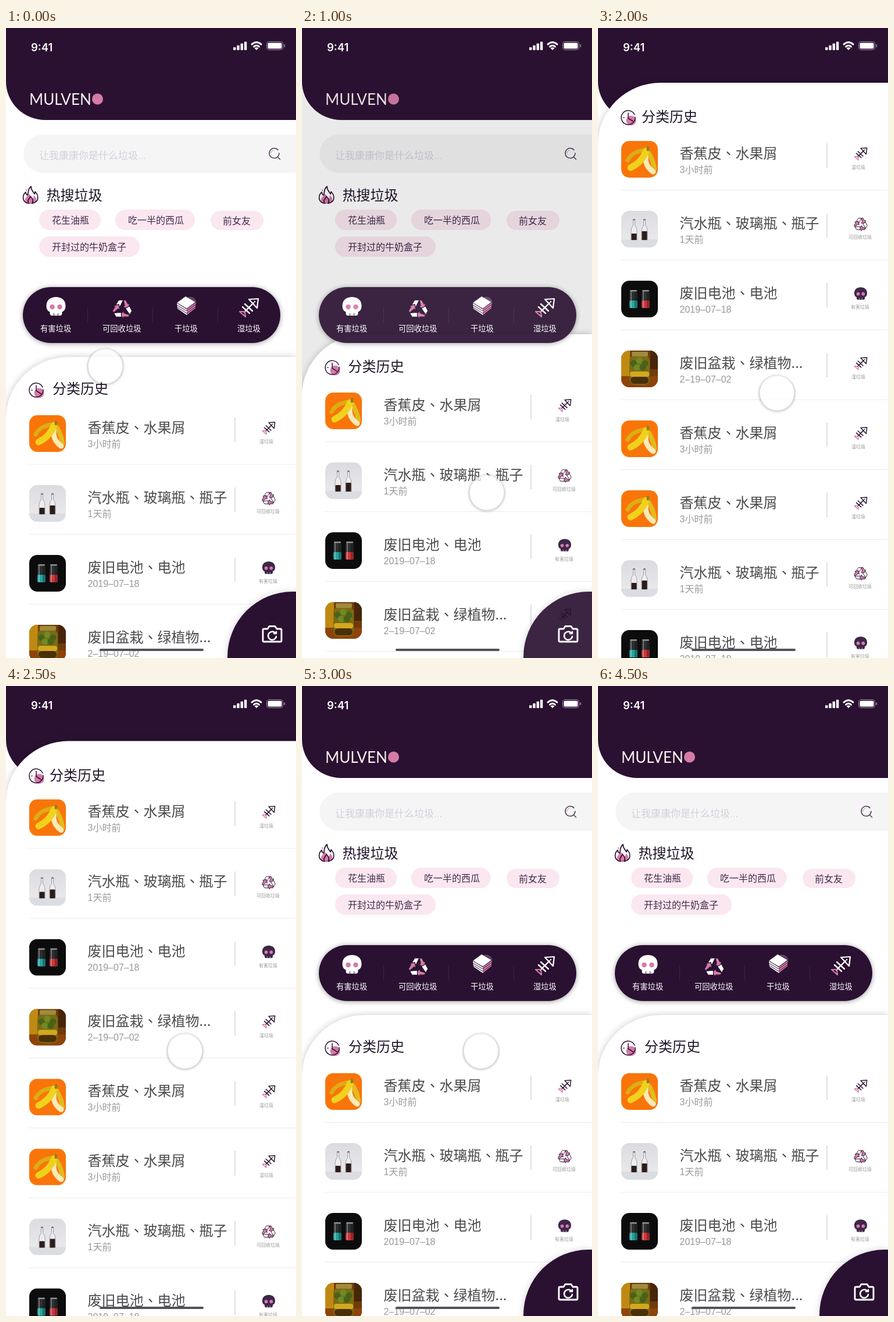
Animation of 499 by 1082 pixels, one loop 4.75 s. Source, as an HTML page:

```html
<!DOCTYPE html>
<html lang="zh-CN">
<head>
<meta charset="utf-8">
<style>
  html, body { margin: 0; width: 100%; height: 100%; overflow: hidden; background: #fff; }
  svg { display: block; width: 499px; height: 1082px; }
  text { font-family: "Liberation Sans", "Noto Sans CJK SC", "Noto Sans CJK", sans-serif; font-weight: 350; }
  .item { font-family: "Noto Sans CJK TC", "Noto Sans CJK", sans-serif; }
  .clock { font-family: Inter, sans-serif; font-weight: 600; }
  .brand { font-family: Lato, sans-serif; font-weight: 400; }
  .soft { filter: drop-shadow(0 1px 4px rgba(0,0,0,.4)); }
  .sheet { filter: drop-shadow(0 0 6px rgba(0,0,0,.22)); }
  .halo { filter: drop-shadow(0 0 6px rgba(30,0,40,.18)); }
</style>
</head>
<body>
<svg id="stage" viewBox="0 0 499 1082"></svg>
<script>
const INK = '#2a1132', HEADING = '#21142a', PINK = '#d57ba8';
const LOOP = 4750, TICK = 250;
const HOME_TOP = 565, OPEN_TOP = 94, ROW = 120;

const text = (x, midY, size, fill, str, attrs = '') =>
  `<text x="${x}" y="${midY + size * .37}" font-size="${size}" fill="${fill}" ${attrs}>${str}</text>`;
const at = (x, y, body, scale = 1) => `<g transform="translate(${x} ${y}) scale(${scale})">${body}</g>`;
const path = (d, fill, extra = '') => `<path d="${d}" fill="${fill}" ${extra}/>`;
const line = (d, stroke, width) =>
  `<path d="${d}" fill="none" stroke="${stroke}" stroke-width="${width}" stroke-linecap="round" stroke-linejoin="round"/>`;
const dot = (x, y, r, fill) => `<circle cx="${x}" cy="${y}" r="${r}" fill="${fill}"/>`;
const box = (x, y, w, h, r, fill, extra = '') =>
  `<rect x="${x}" y="${y}" width="${w}" height="${h}" rx="${r}" fill="${fill}" ${extra}/>`;

// Icons are centred on 0,0
const skull = color =>
  path('M-16.5-1C-16.5-11-9-16 0-16S16.5-11 16.5-1C16.5 4 15 8 10.500 9.500V12Q10.500 16 6.500 16H-6.500Q-10.500 16-10.500 12V9.500C-15 8-16.500 4-16.500-1Z', color) +
  dot(-6.5, 1, 4.3, PINK) + dot(6.5, 1, 4.3, PINK) +
  line('M-3.500 12.500V15.500M3.500 12.500V15.500', color === '#fff' ? INK : '#fff', 1);

const recycle = edge => [0, 120, 240].map(turn => `<g transform="translate(0 2) rotate(${turn})">` +
  path('M-11-8L-6-16H2L-4-4Z', '#fff', `stroke="${edge}" stroke-width="1.3"`) +
  path('M2-16H6L10-9L13-10L10-1L1-4L4-6Z', PINK, `stroke="${edge}" stroke-width="1.3"`) + '</g>').join('');

const papers = () =>
  dot(7, -5, 10.5, '#5a4562') +
  path('M1 6L16-5V4L1 16Z', PINK) + path('M-16-5L1 6V16L-15 5Z', '#fff') +
  path('M-16-5L-1-16L16-6L1 5Z', '#fff') +
  line('M-16-1L1 9L16-2M-15 3L1 13L16 2M-16-5L1 5.500L16-6', INK, 1);

const fish = color =>
  line('M0-14L16-15L14 1Z', color, 2.2) + line('M8-8L-8 8M-7-6L6 6M-11-1L1 10', color, 2.4) +
  dot(10, -10, 1.3, color) + line('M-16 7L-7 7L-6 16Z', PINK, 2.2);

const clock = () =>
  dot(5, 5, 8.5, PINK) + line('M12-1A12 12 0 1 1 11-5M0-8V1L8 6M-8 0H-7', INK, 1.5);

const flame = () =>
  path('M-8 13C-12 5-5 4-4-3C1 0 2 4 2 7C5 6 6 3 6 0C12 6 12 13 3 15H-3Z', PINK) +
  line('M-5 14C-16 10-13-1-8-5C-8-2-7-1-5 0C-3-4-5-10 1-15C1-8 5-6 7-2C8-3 8-4 8-6C14 0 16 11 4 14M-3 14C-7 8-1 7 0 2C5 7 5 11 3 14', INK, 1.7) +
  line('M-7-9V-8', PINK, 2);

const camera = () =>
  line('M-14-9H-8L-5-13.500H5L8-9H14Q16-9 16-7V11Q16 13 14 13H-14Q-16 13-16 11V-7Q-16-9-14-9Z', '#fff', 2.9) +
  line('M6-1A7 7 0 1 0 7 4M7-4V-1H3', '#fff', 2.5);

// Thumbnails, 63 by 63
const photos = {
  banana: box(0, 0, 63, 63, 0, '#f9750a') +
    line('M11 33C18 20 30 17 45 15', '#dcae12', 7) +
    line('M48 22C52 30 56 36 57 48', '#e3bb1c', 8) +
    line('M42 25C41 38 45 46 55 53', '#fbe9b8', 9) +
    line('M43 17C38 30 29 40 16 46', '#f0d21c', 11) +
    line('M46 12V15', '#94801a', 5),
  bottles: box(0, 0, 63, 63, 0, 'url(#grey)') + box(0, 49, 63, 14, 0, '#dcdde2') + [22, 40].map(x =>
    path(`M${x - 1.5} 15h3v10q3.500 4 3.500 9v16h-10v-16q0-5 3.500-9z`, '#ededf0', 'stroke="#8f8f94" stroke-width=".8"') +
    box(x - 4.5, x < 30 ? 39 : 35, 9, x < 30 ? 11 : 15, 1, '#2c1c1a') + box(x - 2, 14, 4, 2.5, 1, '#777')).join(''),
  batteries: box(0, 0, 63, 63, 0, '#0c0c0d') + [[14, '#26a39f'], [35, '#c9363b']].map(([x, color]) =>
    box(x, 18, 14, 29, 3, '#2d2f31') + box(x, 34, 14, 13, 2, color) +
    box(x + 2, 18, 2, 29, 1, '#fff', 'opacity=".3"') + box(x + 9, 18, 5, 29, 2, '#000', 'opacity=".3"') +
    box(x + 1, 16, 12, 2.5, 1.2, '#8f9192')).join(''),
  jar: box(0, 0, 63, 63, 0, '#6f3c08') + box(0, 44, 63, 19, 0, '#8e4309') +
    path('M0 0H15V44H0Z', '#c08912') + path('M50 0H63V32H50Z', '#46260a') +
    box(14, 8, 35, 51, 9, '#7c6a14') + box(18, 2, 28, 8, 2, '#a08a3c') +
    [[21, 22], [31, 17], [41, 22], [27, 29], [37, 29]].map(([x, y], i) => dot(x, y, 5.5, i % 2 ? '#6f8a24' : '#47631a')).join('') +
    box(15, 36, 33, 9, 4, '#d3a81f') + box(16, 45, 31, 12, 6, '#493008')
};

const kinds = {
  banana: ['香蕉皮、水果屑', '3小时前', '湿垃圾', 436, fish(INK)],
  bottles: ['汽水瓶、玻璃瓶、瓶子', '1天前', '可回收垃圾', 431, recycle(INK)],
  batteries: ['废旧电池、电池', '2019–07–18', '有害垃圾', 435, skull('#3f264b')],
  jar: ['废旧盆栽、绿植物...', '2–19–07–02', '湿垃圾', 436, fish(INK)]
};
const history = ['banana', 'bottles', 'batteries', 'jar', 'banana', 'banana', 'bottles', 'batteries'];

function row(kind, i) {
  const [title, when, label, labelX, icon] = kinds[kind];
  return at(0, 100 + i * ROW,
    at(40, 0, `<g clip-path="url(#thumb)">${photos[kind]}</g>`) +
    text(140.5, 21, 24, '#4a4a4d', title, 'class="item" lang="zh-TW"') + text(140.5, 49, 16, '#98989b', when) +
    box(393.3, 4, 1.4, 42, 0, '#d5d5d7') + box(40, 84, 459, 1, 0, '#ececee') +
    at(452, 22, icon, .67) + text(labelX, 45.500, 8, '#98989b', label));
}

const pills = [
  [57, 312, 106, 35, 79, '花生油瓶'], [188, 312, 137, 35, 210, '吃一半的西瓜'],
  [352, 314, 91, 33, 373, '前女友'], [57, 358, 173, 35, 79, '开封过的牛奶盒子']
];
const sorts = [
  [86, 478, 59, '有害垃圾', skull('#fff')], [200, 481, 166, '可回收垃圾', recycle(INK)],
  [310, 477, 290, '干垃圾', papers()], [418, 480, 398, '湿垃圾', fish('#fff')]
];

const status = text(43, 33, 18.500, '#fff', '9:41', 'class="clock"') +
  [0, 1, 2, 3].map(i => box(391 + i * 6.3, 33 - i * 3.2, 4.4, 5 + i * 3.2, 1, '#fff')).join('') +
  line('M423 28Q431 21 439 28M426.500 32Q431 28 435.500 32', '#fff', 3) + path('M427.500 34.500Q431 32 434.500 34.500L431 38Z', '#fff') +
  box(448.5, 23.500, 28, 14, 4, 'none', 'stroke="#9a8da0"') + box(450.5, 25.500, 24, 10, 2, '#fff') +
  box(478.5, 28, 1.6, 5, .8, '#9a8da0');

document.getElementById('stage').innerHTML = `
  <defs>
    <clipPath id="thumb"><rect width="63" height="63" rx="14"/></clipPath>
    <linearGradient id="grey" x2="0" y2="1"><stop stop-color="#dcdce0"/><stop offset="1" stop-color="#ececef"/></linearGradient>
  </defs>
  ${box(0, 0, 499, 1082, 0, '#000')}
  <g id="home">
    ${box(0, 0, 499, 1082, 0, '#fff')}
    ${path('M499 183H63A32.750 32.750 0 0 0 63 248.500H499Z', '#f5f5f6')}
    ${text(57, 218.500, 17, '#d5d0d9', '让我康康你是什么垃圾...')}
    ${line('M470 215A8.500 8.500 0 1 1 468 209.500M467.500 221.500L471.500 225.500', '#4c3a55', 1.5)}
    ${line('M456 215Q456 211 460 210', PINK, 1)}
    ${at(42, 287, flame())}
    ${text(69.5, 287.500, 24, HEADING, '热搜垃圾')}
    ${pills.map(([x, y, w, h, tx, label]) => box(x, y, w, h, h / 2, '#fae7f0') + text(tx, y + h / 2 + .5, 16, '#432b4b', label)).join('')}
  </g>
  ${path('M0 0H499V158H68A68 66 0 0 1 0 92Z', INK)}
  <g id="logo">${text(40, 122, 26, '#fbf3ee', 'MULVEN', 'class="brand"')}${dot(157.5, 122, 9.5, PINK)}</g>
  ${status}
  <g id="sheet">
    ${path('M499 0H108A108 105 0 0 0 0 105V1000H499Z', '#fff', 'class="sheet"')}
    <g id="heading">${at(52, 57, clock())}<g id="title">${text(80, 54.500, 24, HEADING, '分类历史')}</g></g>
    ${history.map(row).join('')}
  </g>
  <g id="front">
    ${box(29, 445, 443, 96, 48, INK, 'class="soft"')}
    ${[140, 252, 364].map(x => box(x, 480, 1, 26, 0, '#3a2343')).join('')}
    ${sorts.map(([x, y, tx, label, icon]) => at(x, y, icon) + text(tx, 516, 13.300, '#fff', label)).join('')}
    ${path('M499 968H493A112 112 0 0 0 381 1080V1082H499Z', INK, 'class="halo"')}
    ${at(458, 1041, camera())}
  </g>
  ${box(161, 1066, 179, 4, 2, '#55505a')}
  <g id="finger">
    <circle r="31" fill="none" stroke="#000" stroke-opacity=".06" stroke-width="5" cy="2"/>
    <circle r="30.500" fill="none" stroke="#000" stroke-opacity=".1" stroke-width="2" cy="1.500"/>
    ${dot(0, 0, 29.5, 'rgba(255,255,255,.72)')}
  </g>`;

// time, x, y of the touch point
const touch = [
  [0, 171, 580], [250, 235, 674], [500, 295, 763], [750, 318, 797], [1500, 318, 797],
  [1750, 312, 690], [2000, 308, 626], [3000, 308, 626], [3250, 335, 515],
  [3500, 382, 326], [3750, 408, 150], [4000, 424, 15], [4250, 425, -20]
];
function touchAt(t) {
  const next = touch.findIndex(key => key[0] > t);
  if (next < 0) return touch[touch.length - 1].slice(1);
  const [t0, x0, y0] = touch[next - 1], [t1, x1, y1] = touch[next];
  const k = (t - t0) / (t1 - t0);
  return [x0 + (x1 - x0) * k, y0 + (y1 - y0) * k];
}

const slide = (t, start) => {
  const u = Math.min(1, Math.max(0, (t - start) / 317));
  return u * u * (3 - 2 * u);
};
const el = id => document.getElementById(id);
const move = (id, x, y) => el(id).setAttribute('transform', `translate(${x} ${y})`);
const fade = (id, opacity) => el(id).setAttribute('opacity', opacity);

function render(time) {
  const t = Math.floor(time % LOOP / TICK) * TICK;
  const open = slide(t, 944) - slide(t, 2494);
  move('sheet', 0, HOME_TOP + (OPEN_TOP - HOME_TOP) * open);
  move('heading', 0, 3 * open);
  move('title', -5 * open, open);
  fade('home', open < .5 ? 1 - open : 1);
  fade('logo', 1 - open);
  fade('front', 1 - open);
  move('finger', ...touchAt(t));
  fade('finger', t < 4500 ? 1 : 0);
}

const start = performance.now();
(function loop() {
  render(performance.now() - start);
  requestAnimationFrame(loop);
})();
</script>
</body>
</html>
```
